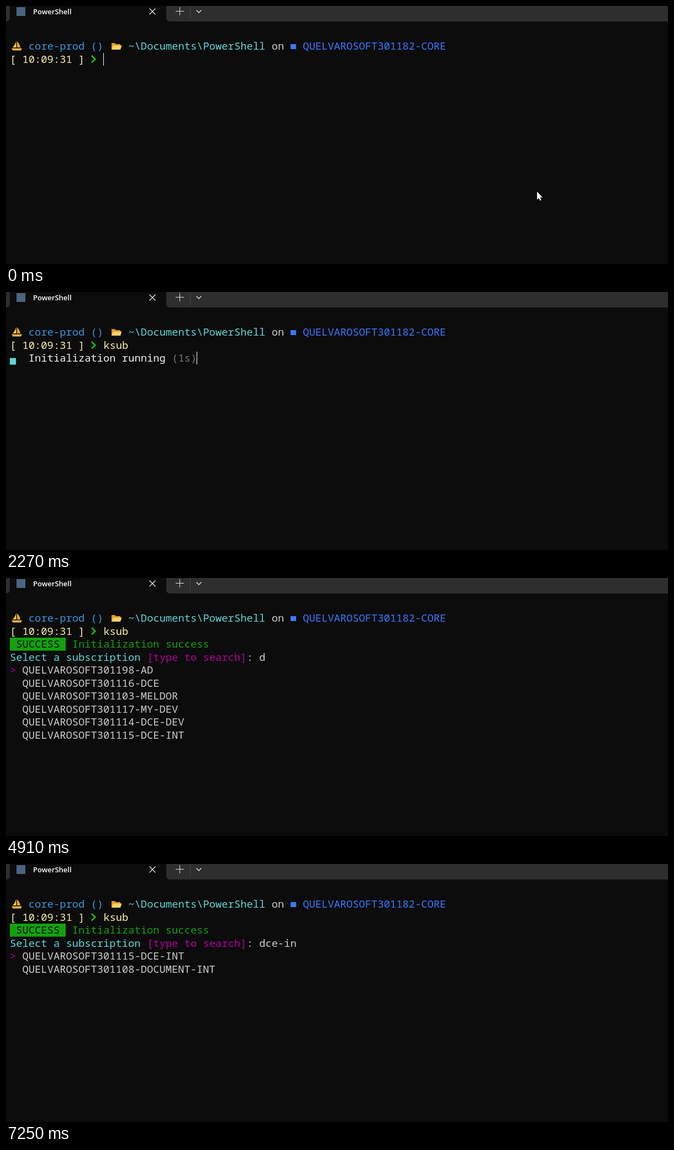
An HTML page with a canvas for the animation above (8 s loop, 1198x467 px).

```html
<!DOCTYPE html>
<html lang="en">
<head>
<meta charset="utf-8">
<title>Subscription picker</title>
<style>
html, body { margin: 0; width: 100%; height: 100%; overflow: hidden; background: #0c0c0c; }
canvas { display: block; }
</style>
</head>
<body>
<canvas id="stage" width="1198" height="467"></canvas>
<script>
const ctx = document.getElementById('stage').getContext('2d');
const LOOP = 8000, CELL = 11.28, ROW = 23.55, LEFT = 7, TOP = 61;
const MONO = '500 18.8px "Noto Sans Mono", "DejaVu Sans Mono", monospace';
const BG = '#0c0c0c', GREY = '#cccccc', WHITE = '#f2f2f2', DIM = '#767676', CYAN = '#61d6d6',
  SKY = '#3a96dd', BLUE = '#3b78ff', YELLOW = '#f9f1a5', GREEN = '#13a10e', LIME = '#16c60c',
  MAGENTA = '#b4009e';

const ORG = 'QUELVARO';
const items = [
  'ASSETS301303-RUN', 'SOFT301100-TERRAFORM', 'SOFT301101-MELDOR-DEV', 'SOFT301102-MELDOR-INT',
  'SOFT301103-MELDOR', 'SOFT301104-COMMERCE-DEV', 'SOFT301105-COMMERCE-INT',
  'SOFT301106-COMMERCE', 'SOFT301107-DOCUMENT-DEV', 'SOFT301108-DOCUMENT-INT',
  'SOFT301109-DOCUMENT', 'SOFT301114-DCE-DEV', 'SOFT301115-DCE-INT', 'SOFT301116-DCE',
  'SOFT301117-MY-DEV', 'SOFT301198-AD'
].map(name => ORG + name);

const commandKeys = [1130, 1200, 1350, 1440];
const searchKeys = [4910, 5110, 5260, 5970, 7030, 7250];
const spinTurns = [1700, 1850, 2060, 2270, 2490, 2620, 2770, 3050, 3270];
const timerTicks = [2130, 3270];
const ENTER = 1520, START = 1610, DONE = 3480, LIST = 3550;

const count = (times, t) => times.filter(x => x <= t).length;
const within = (t, a, b) => t >= a && t < b;
const colX = col => LEFT + col * CELL;
const rowY = row => Math.round(TOP + row * ROW);

function text(str, col, row, color) {
  ctx.font = MONO;
  ctx.fillStyle = color;
  ctx.fillText(str, colX(col), rowY(row) + 18);
}

function rect(x, y, w, h, color) {
  ctx.fillStyle = color;
  ctx.fillRect(x, y, w, h);
}

function fill(path, color) {
  ctx.fillStyle = color;
  ctx.fill(new Path2D(path));
}

function line(path, color, width) {
  ctx.strokeStyle = color;
  ctx.lineWidth = width;
  ctx.stroke(new Path2D(path));
}

function caret(col, row) {
  rect(Math.round(colX(col)), rowY(row), 1, 23, '#ffffff');
}

function titleBar() {
  rect(0, 0, 1198, 28, '#2e2e2e');
  fill('M0 28Q7 28 7 21V0H290V21Q290 28 297 28Z', BG);
  rect(19, 2, 16, 16, '#4a6580');
  ctx.font = '600 13px "Open Sans", "Noto Sans", sans-serif';
  ctx.fillStyle = '#ffffff';
  ctx.fillText('PowerShell', 49, 15);
  line('M259.5 4.5L270.5 15.5M270.5 4.5L259.5 15.5', '#f0f0f0', 1.2);
  line('M307 9.5H322M314.5 2V17', '#e4e4e4', 1);
  line('M333.5 0V23', '#454545', 1);
  line('M344.5 7.5L349 12L353.5 7.5', '#e4e4e4', 1.4);
}

function boat() {
  fill('M18.5 63V75H12Q17 70 18.5 63Z', '#ffc83d');
  fill('M20 64Q25 69 26 75H20Z', '#f5a623');
  fill('M10 76.5H29L27 80.5H12.5Z', '#e8b04a');
}

function folder() {
  fill('M191 67H197L199 69H207V79H191Z', '#d9962a');
  fill('M194 71.5H209.5L207 79H191Z', '#ffd166');
}

function prompt() {
  boat();
  text('core-prod ()', 3, 0, SKY);
  folder();
  text('~\\Documents\\PowerShell', 19, 0, CYAN);
  text('on', 42, 0, GREY);
  rect(515, 69, 10, 9, BLUE);
  text(ORG + 'SOFT301182-CORE', 47, 0, BLUE);
  text('[ 10:09:31 ]', 0, 1, YELLOW);
  line('M155 90L161.3 96.2L155 102.4', LIME, 2.6);
}

function pointer(t) {
  fill('M961 336V350.5L964.3 347.4L966.4 352.2L968.6 351.2L966.5 346.6H971Z', '#ffffff');
  if (within(t, 190, 340)) {
    ctx.beginPath();
    ctx.arc(960, 334.5, 11, 0, 7);
    ctx.fillStyle = 'rgba(255,255,0,.47)';
    ctx.fill();
  }
}

function status(t) {
  const step = count(spinTurns, t) % 4;
  const right = step > 1, low = step % 3 === 0;
  rect(right ? 18 : 7, low ? 119.5 : 108, 11, 12, CYAN);
  text('Initialization running', 3, 2, WHITE);
  text(`(${count(timerTicks, t)}s)`, 26, 2, DIM);
  if (t < 1700 || within(t, 2270, 2840) || t >= 3270) caret(30, 2);
}

// Letters of the query must occur in order; shorter names rank first.
function search(query) {
  if (!query) return items;
  const pattern = new RegExp([...query].join('.*'), 'i');
  return items.filter(s => pattern.test(s)).sort((a, b) => a.length - b.length);
}

function picker(t) {
  const query = 'dce-in'.slice(0, count(searchKeys, t));
  const shown = within(t, 4910, 4980) ? 6 : 10;
  text('Select a subscription', 0, 3, CYAN);
  text('[type to search]', 22, 3, MAGENTA);
  text(': ' + query, 38, 3, GREY);
  text('>', 0, 4, MAGENTA);
  search(query).slice(0, shown).forEach((name, i) => text(name, 2, 4 + i, GREY));
}

function draw(t) {
  rect(0, 0, 1198, 467, BG);
  titleBar();
  prompt();
  if (t < 1060) pointer(t);

  const typed = count(commandKeys, t);
  text('ksub'.slice(0, typed), 15, 1, YELLOW);
  if (t < 560 || within(t, commandKeys[0], ENTER)) caret(15 + typed, 1);
  if (within(t, ENTER, START)) caret(0, 2);
  if (within(t, START, DONE)) status(t);
  if (t >= DONE) {
    rect(7, 108, 101, 23.5, GREEN);
    text('SUCCESS', 1, 2, BG);
    text('Initialization success', 10, 2, GREEN);
  }
  if (t >= LIST) picker(t);
}

const began = performance.now();
function tick() {
  draw((performance.now() - began) % LOOP);
  requestAnimationFrame(tick);
}
tick();
</script>
</body>
</html>
```
